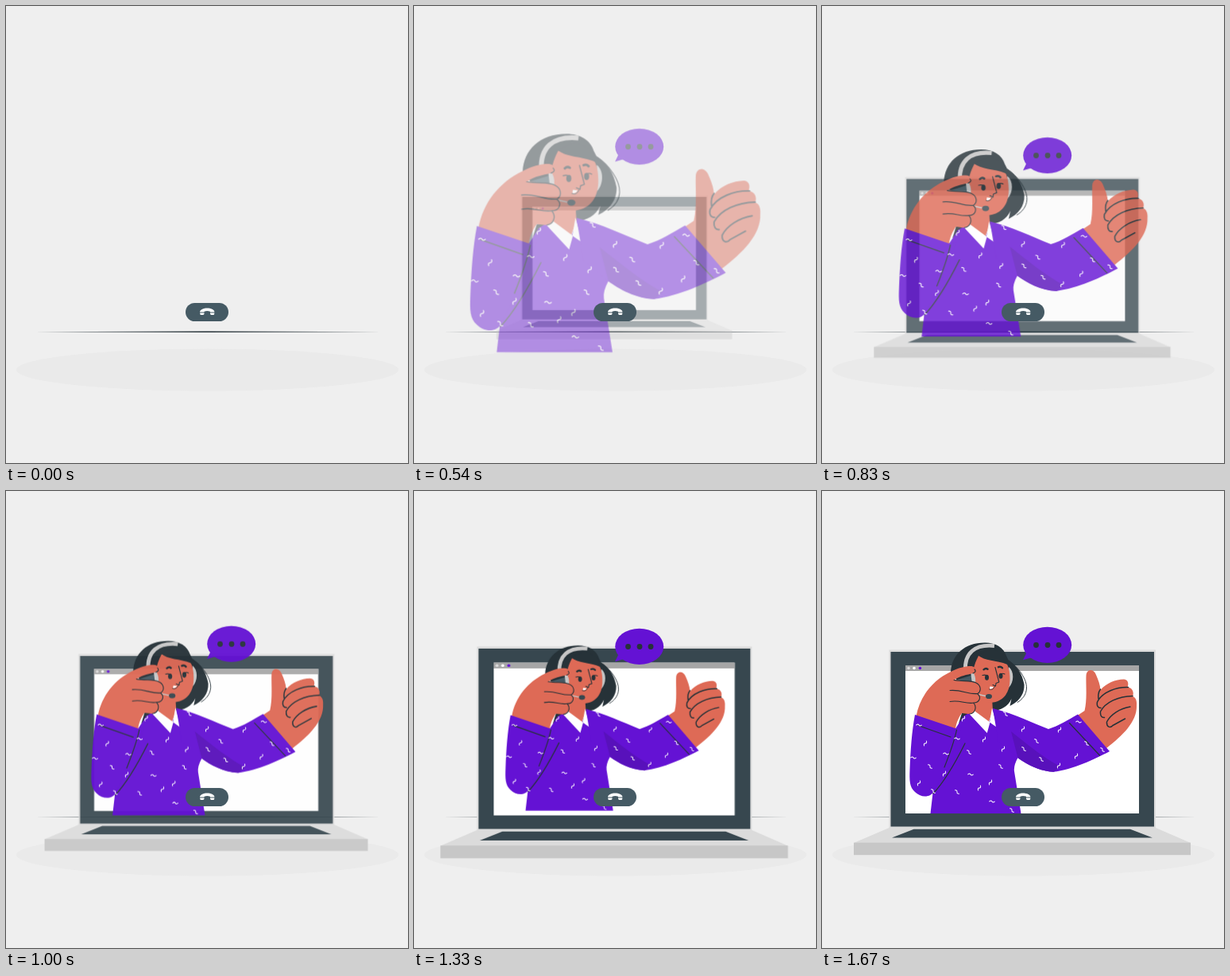
An HTML page that plays this animation: 506 px wide and 574 px high, repeating every 1.71 s.

```html
<!DOCTYPE html>
<html lang="en">
<head>
<meta charset="utf-8">
<title>Support call</title>
<style>
  html, body { margin: 0; width: 100%; height: 100%; overflow: hidden; background: #efefef; }
  svg { display: block; width: 506px; height: 574px; }
  .enter {
    animation: 1633ms cubic-bezier(.36, -.01, .5, 1.38) both paused;
    animation-delay: calc(var(--wait, 0ms) - var(--t, 0) * 1ms);
  }
  #laptop {
    --wait: 12ms;
    animation-name: zoom-in;
    animation-duration: 1696ms;
    transform-origin: 252px 328.2px;
  }
  #agent { animation-name: zoom-out; transform-origin: 253px 297.8px; }
  #bubble { animation-name: slide-down; }
  @keyframes zoom-in { from { opacity: 0; transform: scale(.5); } to { opacity: 1; transform: none; } }
  @keyframes zoom-out { from { opacity: 0; transform: scale(1.5); } to { opacity: 1; transform: none; } }
  @keyframes slide-down { from { opacity: 0; transform: translateY(-30px); } to { opacity: 1; transform: none; } }
  .skin { fill: #de6a56; }
  .cloth { fill: #6412d4; }
  .shade { fill: #5811bb; }
  .dark { fill: #263238; }
  .steel { fill: #37474f; }
  .grey { fill: #c7c7c7; }
  .white { fill: #fff; }
  .ink { fill: none; stroke: #263238; stroke-linecap: round; stroke-linejoin: round; }
  #marks { fill: none; stroke: #fff; stroke-width: 1; stroke-linecap: round; }
</style>
</head>
<body>
<svg id="scene" viewBox="0 0 506 574">
  <ellipse cx="253.5" cy="457" rx="240.5" ry="26.5" fill="#eaeaea"/>
  <path class="dark" d="M36 409.3L253 408.4L472 409.3L253 409.9Z"/>

  <g id="laptop" class="enter">
    <path fill="#dbdbdb" d="M84.5 199.5H420V423L464 442H40L84.5 423Z"/>
    <path class="steel" d="M86.5 202H418V421.5H86.5ZM115.5 424.7H388L416 435.5H88Z"/>
    <rect class="white" x="105" y="219" width="294" height="186"/>
    <rect fill="#a6a6a6" x="105" y="219" width="294" height="7"/>
    <circle cx="109" cy="222.5" r="1.8" fill="#dbdbdb"/>
    <circle class="white" cx="116" cy="222.5" r="1.8"/>
    <circle class="cloth" cx="123.4" cy="222.5" r="1.8"/>
    <rect class="grey" x="40" y="441.7" width="424" height="15.5"/>
  </g>

  <g id="agent" class="enter">
    <!-- hair, neck, torso -->
    <path class="dark" d="M162 228C163 206 179 190.5 205 190.5C219 190.5 229 197 232 207L235 213C245 219 252 229 254.500 243C255 256 247 265 236.5 270L238.5 261C234 271 224 276.5 213 276C198 275 186 266 180 250Z"/>
    <path class="ink" stroke-width=".9" d="M235 213C247 221 258 236 257.500 248C257 256 252 262 246 265.500"/>
    <path class="skin" d="M189 258L186 278L209 292L215 276L214 260Z"/>
    <path class="dark" d="M176 279H187L180 288L172 292Z"/>
    <path class="cloth" d="M187 277.500L178 283L167 300L150 345L140 375L136.500 405H250.500L242 352Q241 345 246.500 335L262 300L216 273.500L209 294Z"/>
    <path class="white" d="M189 274L185.800 280.500L207.800 304L211.500 290.500ZM211 290.500L214 272.500L221 297.500Z"/>

    <!-- face and headset -->
    <path class="grey" d="M235 221C242 226 242 240 235 247Z"/>
    <path class="skin" d="M197 207C190 220 188 234 189 247C192 259 201 266 212 266C226 265 236 256 236.500 238C236.700 228 235 219 231 215Z"/>
    <path class="dark" d="M196 206C205 214 219 212 233.500 218L231 207L215 198Z"/>
    <path fill="none" stroke="#c7c7c7" stroke-width="4.800" d="M180.500 226C179 204 192 192 217 194.500"/>
    <path fill="#455a64" d="M167 238L190 231L191 242L170 242Z"/>
    <path class="grey" d="M187 226C192 227 195 237 192 244L189 243Z"/>
    <path class="ink" stroke-width="2.400" d="M203.500 224.300Q206 222 208.500 223.800M222 221.200Q225 220 227 222.300"/>
    <ellipse class="dark" cx="207.500" cy="234.200" rx="2.500" ry="3.500"/>
    <ellipse class="dark" cx="225" cy="232.300" rx="2.500" ry="3.500"/>
    <path class="ink" stroke-width="1.100" d="M202 231.500Q205 230.500 208 232M225 230Q227.500 228.500 230 230M218 221.500L222.800 240L219 241.500L218.500 245L215 243.500"/>
    <path class="white" d="M211.500 245.500L216 246Q214.500 249.500 211 248.500Z"/>
    <path class="ink" stroke-width=".8" d="M210.500 249Q215 251 217.500 245.500"/>
    <path fill="none" stroke="#c7c7c7" stroke-width="1.300" d="M190 254L206 257.500"/>
    <ellipse class="steel" cx="210" cy="258" rx="4" ry="3.100"/>

    <!-- hand at the headset -->
    <path class="skin" d="M118.500 283C123 258 139 238 162 227C172 222 180 220 187 220C194 220 196 227 190 229C182 231 174 232 167 237C178 239 188 238 194 241C200 244 201 250 197 255C202 259 198 266 191 266C195 270 194 280 184 280L176 279C173 283 169 290 168 299Z"/>
    <path class="ink" stroke-width="1.100" d="M166 237.500C178 239.500 188 237.500 194 241C200 244 201 251 196 254.500C184 256 176 249 161 250.500M196 255C201 259 198 266 191 266C181 268 174 262 161 264.500M191 266.500C195 271 193 279 186 280M192 224Q195 227 190 229"/>
    <path class="cloth" d="M117 281L169 298.500L176 296L168 322L141 377C136 386 124 385 117 378C110 372 110 363 110.500 350C111.500 325 113 302 117 281Z"/>
    <path class="ink" stroke-width="1.200" d="M121 294.500L162 309M169.500 300C166 317 160 332 154 347M180 317C168 341 155 364 140 380"/>

    <!-- thumbs up -->
    <path class="skin" d="M320 283L330.500 276C334 262 332 243 332.500 232C333 223 342 223 345 231C348 238 350 243 350.500 250C358 241 369 237 380 236.500C386 237 386 243 384.500 246.500C391 247 393 253 391 258C395 259 396.500 264 396 269C397 289 379 307 358 323Z"/>
    <path class="ink" stroke-width="1.500" d="M385.500 246.500C371 246 353 252 346.500 265C345.500 270 347.500 272.500 351 272.500M391 257.500C373 258 357 265 350.500 277C350 282 352 285 355.500 284.500M388 271C375 273 363 281 358.500 290C358 297 363 298 366 294.500L381.500 286M350.500 249Q347 253 348 261"/>
    <path class="cloth" d="M215 273C240 279 262 290 285 299C298 295 309 288 322 280.500L362 327C343 337 316 350 291 352.800C273 352 257 343 246 335L222 315Z"/>
    <path class="shade" d="M238 302C257 317 280 336 300 346L292 352.700C274 352 257 343 246.500 335Z"/>
    <path class="ink" stroke-width="1.200" d="M311.500 291.500L349.500 332"/>
    <g id="marks"></g>
  </g>

  <g id="bubble" class="enter">
    <path class="cloth" d="M257.500 203L253 212.300L268 208Z"/>
    <ellipse class="cloth" cx="283.700" cy="193.300" rx="30.500" ry="22.600"/>
    <g class="dark">
      <circle cx="269.500" cy="193.500" r="3.400"/>
      <circle cx="284" cy="193.500" r="3.400"/>
      <circle cx="298" cy="193.500" r="3.400"/>
    </g>
  </g>

  <rect x="226" y="373" width="54" height="23" rx="11.500" fill="#455a64"/>
  <path class="white" d="M244 384.600C244.500 377.900 262 377.900 262.500 384.600H257V383.800Q253.200 382.200 249.500 383.800V384.600ZM244.200 385.400H249.500V386.800Q249.300 387.900 248 388H245.300Q244.200 387.700 244.200 386.500ZM257 385.400H262.300V386.500Q262.200 387.700 261.200 388H258.500Q257.200 387.900 257 386.800Z"/>
</svg>
<script>
  // Squiggles on the sweater, grouped by their tilt in degrees.
  const squiggles = {
    10: "122,294 115,335 156,330 187,356 214,390 170,311 323,290",
    "-55": "130,317 122,367 154,355 198,373 204,312 228,324 178,286 253,299 299,300 320,333 298,345 212,366",
    50: "136,346 140,377 170,378 185,328 225,346 239,401 231,280 254,324 276,337 270,314 333,317 353,325"
  };
  const marks = document.getElementById("marks");
  for (const [tilt, points] of Object.entries(squiggles)) {
    for (const at of points.split(" ")) {
      const mark = document.createElementNS("http://www.w3.org/2000/svg", "path");
      mark.setAttribute("d", "M-3.200 .5Q-1.500 -1.800 0 0T3.200 -.5");
      mark.setAttribute("transform", `translate(${at}) rotate(${tilt})`);
      marks.append(mark);
    }
  }

  // The entrance advances in steps at 24 per second.
  const LOOP = 1710, STEPS = 41, STEP = 1000 / 24;
  const scene = document.getElementById("scene");
  const start = performance.now();
  function tick() {
    const t = (performance.now() - start) % LOOP;
    const step = Math.min(STEPS, Math.floor((t + 5) / STEP) + 1);
    scene.style.setProperty("--t", step * STEP);
    requestAnimationFrame(tick);
  }
  tick();
</script>
</body>
</html>
```
